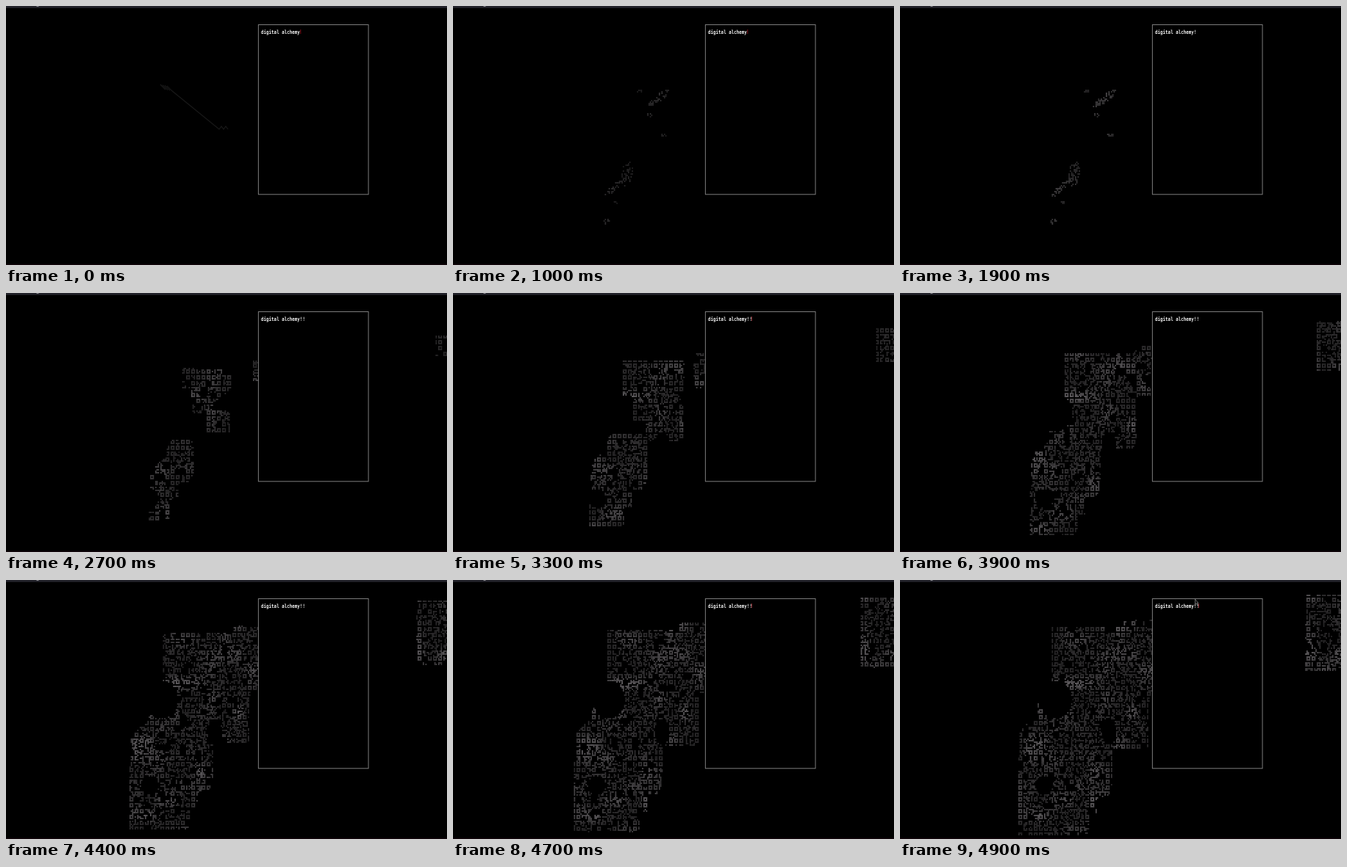
An HTML page with a canvas that plays this animation: 600 by 353 pixels, repeating every 5 s.

```html
<!DOCTYPE html>
<html lang="en">
<head>
<meta charset="utf-8">
<title>Growing cells</title>
<style>
  html, body { margin: 0; width: 100%; height: 100%; overflow: hidden; background: #000; }
  canvas, svg { position: absolute; left: 0; top: 0; width: 600px; height: 353px; }
  text { font: bold 5.87px "DejaVu Sans Mono", "Liberation Mono", monospace; fill: #f0f0f0; }
</style>
</head>
<body>
<canvas id="world" width="600" height="353"></canvas>
<svg viewBox="0 0 600 353">
  <rect width="600" height="2.8" fill="#22222a"/>
  <rect x="41.5" width="3" height="1" fill="#8a8a90"/>
  <rect y="351.5" width="600" height="1.5" fill="#10050a"/>
  <rect x="343.4" y="25.5" width="149.7" height="231.3" fill="#000" stroke="#7c7c7c"/>
  <g transform="translate(347 37.5) scale(1 1.25)"><text id="line">digital alchemy</text></g>
  <rect id="caret" y="32" width="1" height="6" fill="#80101a"/>
  <path id="pointer" d="M401.5 26v7.2l1.5-1.4 1.2 2.6 1-.5-1.1-2.5h1.8z"
        fill="#111" stroke="#a0a0a0" stroke-width=".6"/>
</svg>
<script>
const LOOP = 5000, CW = 1.75, CH = 2, COLS = 362, ROWS = 178, TILE = 4;
const SKETCH_AT = 500, GROW_AT = 2100, FAST_AT = 4400;
const $ = id => document.getElementById(id);
const ctx = $('world').getContext('2d');

// Ellipses: centre, radii, tilt in degrees
const SEEDS = [
  [255, 116, 5, 3, 0],
  [279, 126, 20, 5, -36],
  [268, 149, 4, 4, 0],
  [288, 176, 6, 3, 10],
  [237, 229, 8, 17, 10],
  [218, 249, 17, 4, -46],
  [221, 268, 4, 3, 0],
  [209, 293, 6, 3, -42],
  [351, 106, 4, 3, 0],
  [598, 72, 3, 3, 0]
];
// Places the growth never fills
const VOIDS = [
  [212, 163, 22, 26, 0],
  [196, 280, 12, 13, 0],
  [284, 207, 10, 18, 0]
];

function hash(x, y, salt = 0) {
  let h = Math.imul(x, 374761393) ^ Math.imul(y, 668265263) ^ Math.imul(salt + 7, 1274126177);
  h = Math.imul(h ^ (h >>> 13), 1274126177);
  return ((h ^ (h >>> 16)) >>> 0) / 4294967296;
}

function smooth(x, y, salt) {
  const ix = Math.floor(x), iy = Math.floor(y), fx = x - ix, fy = y - iy;
  const mix = (a, b, f) => a + (b - a) * f * f * (3 - 2 * f);
  return mix(
    mix(hash(ix, iy, salt), hash(ix + 1, iy, salt), fx),
    mix(hash(ix, iy + 1, salt), hash(ix + 1, iy + 1, salt), fx), fy);
}

function inside(x, y, [cx, cy, rx, ry, tilt]) {
  const a = tilt * Math.PI / 180, dx = x - cx, dy = y - cy;
  const u = dx * Math.cos(a) + dy * Math.sin(a);
  const v = dy * Math.cos(a) - dx * Math.sin(a);
  return (u / rx) ** 2 + (v / ry) ** 2 <= 1;
}

// For each cell: its distance in steps from the nearest seed cell
function measureReach() {
  const seeds = [], reach = new Float32Array(COLS * ROWS).fill(Infinity);
  const eachCell = visit => {
    for (let r = 0; r < ROWS; r++) for (let c = 0; c < COLS; c++) visit(c, r, r * COLS + c);
  };
  const hit = (list, c, r) => list.some(e => inside((c + .5) * CW, (r + .5) * CH, e));
  eachCell((c, r) => { if (hit(SEEDS, c, r)) seeds.push([c, r]); });
  eachCell((c, r, i) => {
    if (hit(VOIDS, c, r)) return;
    for (const [sc, sr] of seeds)
      reach[i] = Math.min(reach[i], Math.max(Math.abs(sc - c), Math.abs(sr - r)));
  });
  return reach;
}
const reach = measureReach();

// Each tile holds a hollow square, a bar, loose cells or nothing
function isLit(c, r, gen, depth) {
  const tc = Math.floor(c / TILE), tr = Math.floor(r / TILE), x = c % TILE, y = r % TILE;
  const kind = hash(tc, tr, gen), rings = depth < 5 ? .55 : .14;
  if (kind < rings) return x < 3 && y < 3 && !(x === 1 && y === 1);
  if (kind > .9) return false;
  const stroke = Math.floor(hash(tc, tr, gen + 50) * 6);
  if (stroke === x && y < 3) return true;
  if (stroke === y + 3 && x < 3) return true;
  return hash(c, r, gen) < .27;
}

function drawCells(gen, level) {
  for (let r = 0; r < ROWS; r++) for (let c = 0; c < COLS; c++) {
    const depth = gen - reach[r * COLS + c];
    if (!(depth >= 0)) continue;
    if (gen ? !isLit(c, r, gen, depth) : c * CW > 400 || hash(c, r) > .5 * level) continue;
    const v = level * (32 + 60 * smooth(c / 10, r / 10, 2) ** 2.5 + 14 * hash(c, r, 5));
    ctx.fillStyle = `rgb(${v},${v * .97},${v})`;
    ctx.fillRect(c * CW, r * CH, CW, CH);
  }
}

// Faint leftovers before the drawing starts
function drawResidue() {
  ctx.strokeStyle = '#191919';
  ctx.lineWidth = 1.2;
  ctx.beginPath();
  for (let i = 0; i < 4; i++) {
    ctx.moveTo(210 + i * 3, 107 + i * .6);
    ctx.lineTo(217 + i * 3, 114 + i * .6);
  }
  for (let i = 0; i < 5; i++) ctx.lineTo(290 + i * 3, i % 2 ? 164 : 168);
  ctx.stroke();
}

// The picture is refreshed in uneven steps: slow at first, quick at the end
function hold(t) {
  const snap = (from, step) => from + Math.floor((t - from) / step) * step;
  if (t >= FAST_AT) return snap(FAST_AT, 100);
  return t >= GROW_AT ? snap(GROW_AT, 300) : snap(SKETCH_AT, 400);
}

let shown = null;
function drawWorld(t) {
  const now = hold(t);
  if (now === shown) return;
  shown = now;
  ctx.fillStyle = '#000';
  ctx.fillRect(0, 0, 600, 353);
  if (now >= GROW_AT) drawCells(Math.round(1 + (now - GROW_AT) / 117), 1);
  else if (now >= SKETCH_AT) drawCells(0, .6 + .4 * (now - SKETCH_AT) / 1200);
  else drawResidue();
}

function drawPanel(t) {
  const marks = (t >= 1900) + (t >= 2400);
  const text = 'digital alchemy' + '!'.repeat(marks);
  if ($('line').textContent !== text) $('line').textContent = text;
  $('caret').setAttribute('x', 400.3 + marks * 2.9);
  $('caret').style.opacity = t < SKETCH_AT || (t + 300) % 1200 < 600 ? 1 : 0;
  $('pointer').style.opacity = t >= 4800 ? 1 : 0;
}

const start = performance.now();
function frame() {
  const t = (performance.now() - start) % LOOP;
  drawWorld(t);
  drawPanel(t);
  requestAnimationFrame(frame);
}
frame();
</script>
</body>
</html>
```
